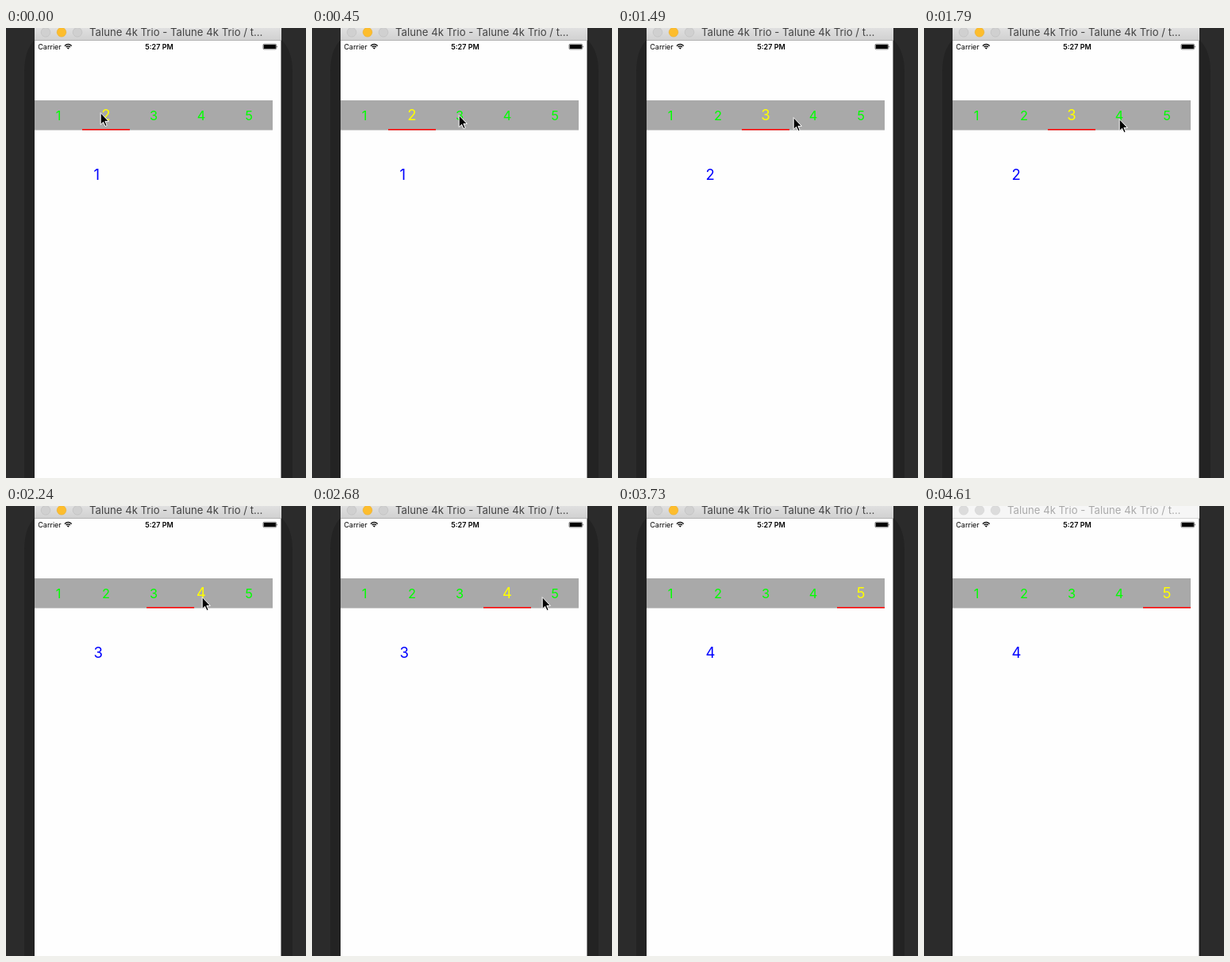
Write an HTML page that moves like this. It is 378 px wide and 566 px high and loops after 4.65 s.

```html
<!DOCTYPE html>
<html lang="en">
<head>
<meta charset="utf-8">
<title>Tab bar</title>
<style>
  html, body { margin: 0; width: 100%; height: 100%; overflow: hidden; background: #2b2b2b; }
  svg { display: block; font-family: Inter, Roboto, "Liberation Sans", sans-serif; }
</style>
</head>
<body>
<svg width="378" height="566" viewBox="0 0 378 566">
  <defs>
    <linearGradient id="chrome" x1="0" y1="0" x2="0" y2="1">
      <stop offset="0" stop-color="#e0e0e0"/>
      <stop offset="1" stop-color="#d1d1d1"/>
    </linearGradient>
  </defs>
  <rect width="378" height="566" fill="#2b2b2b"/>
  <path id="shadow" fill="#232323" d="M36 15Q23 28 23 56V566H361V56Q361 28 347 15Z"/>
  <rect x="35" y="16" width="314" height="550" fill="#222"/>
  <rect x="36" y="15" width="310.5" height="551" fill="#fefefe"/>

  <rect id="bar" x="36" y="0" width="311" height="15"/>
  <rect id="edge" x="36" y="15" width="311" height="1"/>
  <g id="lights" stroke-width="0.6"></g>
  <text id="title" x="105" y="10" font-size="13.2">Talune 4k Trio - Talune 4k Trio / t…</text>

  <text x="40.3" y="27" font-size="9">Carrier</text>
  <g fill="none" stroke="#000" stroke-width="1.3">
    <path d="M73.9 22.4Q78.3 18.4 82.7 22.4"/>
    <path d="M75.6 24.1Q78.3 21.7 81 24.1"/>
  </g>
  <path d="M76.7 25.1Q78.3 23.9 79.9 25.1L78.3 26.8Z"/>
  <text x="193" y="27" font-size="9" font-weight="600" text-anchor="middle">5:27 PM</text>
  <rect x="324" y="20.2" width="16.6" height="6.6" rx="1.3" fill="none" stroke="#000" stroke-width="0.5"/>
  <rect x="324.7" y="20.9" width="15.2" height="5.2" rx="0.7"/>
  <path d="M341.1 22.2Q342.4 23.5 341.1 24.8Z"/>

  <rect x="36" y="91" width="300" height="37.5" fill="#a9a9a9"/>
  <g id="tabs" text-anchor="middle"></g>
  <rect id="line" y="127" width="60" height="1.5" fill="#f00"/>
  <text id="page" x="110.5" y="191.4" font-size="18.5" fill="#00f"></text>
  <path id="cursor" d="M1.2 .6V15.5L4.6 12.3L7 17.6L9.2 16.6L6.9 11.4H11.4Z"
        fill="#000" stroke="#fff" stroke-linejoin="round"/>
</svg>
<script>
const LOOP = 4650, BLUR = 4610;
const FRAME = 149;
const TAB = 60;               // tab width
const taps = [5, 14, 22];
const exit = 25;              // cursor is gone

// Where the cursor heads, and the frame at which it sets off
const home = { x: 118, y: 106 };
const moves = [
  { from: 0, x: 185, y: 109 },
  { from: 9, x: 246, y: 114 },
  { from: 16.8, x: 311, y: 114 },
  { from: 23, x: 320, y: 156 }
];

const $ = id => document.getElementById(id);
const clamp = u => Math.min(1, Math.max(0, u));
const easeOut = u => 1 - (1 - u) ** 3;
const easeInOut = u => u * u * (3 - 2 * u);

function set(el, attrs) {
  for (const key in attrs) el.setAttribute(key, attrs[key]);
  return el;
}

function add(parent, tag, attrs) {
  const el = document.createElementNS("http://www.w3.org/2000/svg", tag);
  return parent.appendChild(set(el, attrs));
}

const lights = [50, 70, 90].map(cx => add($("lights"), "circle", { cx, cy: 5.3, r: 5.8 }));
const tabs = [1, 2, 3, 4, 5].map(n => {
  const el = add($("tabs"), "text", { x: 6 + TAB * n });
  el.textContent = n;
  return el;
});

function drawWindow(active) {
  set($("bar"), { fill: active ? "url(#chrome)" : "#f6f6f6" });
  set($("edge"), { fill: active ? "#b4b4b4" : "#d4d4d4" });
  set($("title"), { fill: active ? "#444" : "#aaa" });
  set($("shadow"), { visibility: active ? "visible" : "hidden" });
  lights.forEach((el, i) => {
    const amber = active && i === 1;
    set(el, {
      fill: amber ? "#fdbd2d" : active ? "#d0d0d0" : "#dcdcdc",
      stroke: amber ? "#e9ae2c" : active ? "#bcbcbc" : "#d2d2d2"
    });
  });
}

function drawTabs(frame) {
  const tab = 2 + taps.filter(tap => tap <= frame).length;
  tabs.forEach((el, i) => {
    const on = i + 1 === tab;
    const size = on ? 18.5 : 16.4;
    set(el, { fill: on ? "#ff0" : "#0f0", "font-size": size, y: 109.75 + 0.36 * size });
  });
  $("page").textContent = tab - 1;

  const slid = taps.reduce((sum, tap) => sum + easeInOut(clamp((frame - tap + 0.08) / 2.7)), 0);
  set($("line"), { x: 96 + TAB * slid });
}

function drawCursor(frame) {
  let { x, y } = home;
  for (const move of moves) {
    const u = easeOut(clamp((frame - move.from) / 4));
    x += (move.x - x) * u;
    y += (move.y - y) * u;
  }
  set($("cursor"), {
    transform: `translate(${Math.round(x)} ${Math.round(y)})`,
    visibility: frame < exit ? "visible" : "hidden"
  });
}

function draw(t) {
  const frame = Math.floor((t + 6) / FRAME);
  drawWindow(t < BLUR);
  drawTabs(frame);
  drawCursor(frame);
}

const start = performance.now();
function tick() {
  draw((performance.now() - start) % LOOP);
  requestAnimationFrame(tick);
}
tick();
</script>
</body>
</html>
```
